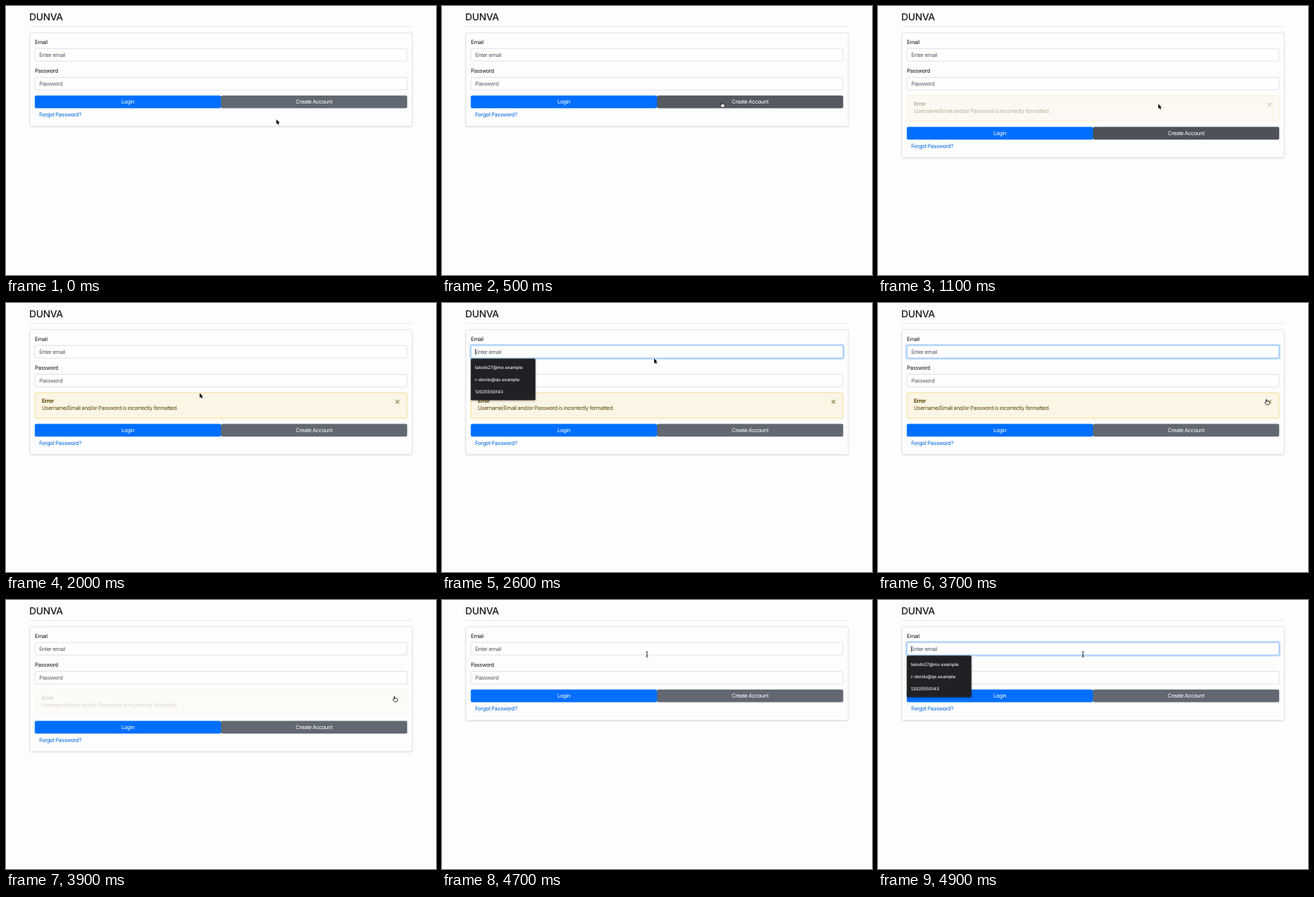
Write an HTML page that moves like this. It is 600 px wide and 375 px high and loops after 5 s.

```html
<!DOCTYPE html>
<html lang="en">
<head>
<meta charset="utf-8">
<title>Login form</title>
<style>
  html, body { margin: 0; width: 100%; height: 100%; overflow: hidden; background: #fdfdfd; }
  svg { display: block; width: 600px; height: 375px; }
  text { font: 400 7.6px Inter, "Open Sans", sans-serif; letter-spacing: -.047em; text-rendering: geometricPrecision; fill: #15181b; }
  .title { font-size: 13.47px; font-weight: 500; letter-spacing: -.02em; }
  .hint { fill: #565c63; }
  .field { fill: #fefefe; stroke: #c8ced4; stroke-width: .6; }
  .button { fill: #fff; text-anchor: middle; }
  .link { fill: #0069e0; }
  #alert text { fill: #5c4600; }
  #alert .bold { font-weight: 700; }
  #alert .close { font-size: 11.5px; font-weight: 700; text-anchor: middle; opacity: .55; }
  #menu { filter: drop-shadow(0 1px 1.5px rgba(0, 0, 0, .3)); }
  #menu text { font-size: 6.2px; font-weight: 500; letter-spacing: -.01em; fill: #f1f1f2; }
  #card { filter: drop-shadow(0 1px 1px rgba(0, 0, 0, .1)); }
</style>
</head>
<body>
<svg viewBox="0 0 600 375">
  <text class="title" x="32.6" y="20">DUNVA</text>
  <path d="M33 28.5H567" stroke="#e4e4e4" stroke-width=".8"/>
  <rect id="card" x="33.2" y="37.2" width="533.6" height="130.3" rx="2" fill="#fdfdfd" stroke="#dcdcdc" stroke-width=".7"/>

  <text x="40.3" y="52.6">Email</text>
  <rect id="glow" x="39.3" y="58.2" width="521.4" height="19.6" rx="2.6" fill="none" stroke="#bfdeff" stroke-width="2"/>
  <rect class="field" x="40.4" y="59.2" width="519.2" height="17.6" rx="2"/>
  <rect id="focusBorder" x="40.4" y="59.2" width="519.2" height="17.6" rx="2" fill="none" stroke="#80bdff" stroke-width=".7"/>
  <text class="hint" x="46.4" y="70.9">Enter email</text>
  <path id="caret" d="M46.5 64V72.5" stroke="#111" stroke-width=".6"/>

  <text x="40.3" y="92.9">Password</text>
  <rect class="field" x="40.4" y="99.4" width="519.2" height="17.6" rx="2"/>
  <text class="hint" x="46.4" y="111.1">Password</text>

  <g id="alert">
    <rect x="40.4" y="125" width="519.2" height="35.6" rx="2" fill="#fbf5e6" stroke="#f4d678" stroke-width=".8"/>
    <text class="bold" x="50" y="139.4">Error</text>
    <text x="50" y="149.2">Username/Email and/or Password is incorrectly formatted.</text>
    <text class="close" x="545.8" y="141.3">×</text>
  </g>

  <g id="actions">
    <rect x="40.2" y="124.8" width="259.8" height="17.8" rx="2" fill="#006fff"/>
    <rect x="300" y="124.8" width="259.8" height="17.8" rx="2" fill="#626872"/>
    <rect id="shade" x="300" y="124.8" width="259.8" height="17.8" rx="2"/>
    <text class="button" x="170" y="136.4">Login</text>
    <text class="button" x="429.8" y="136.4">Create Account</text>
    <text class="link" x="46.3" y="154.4">Forgot Password?</text>
  </g>

  <g id="menu">
    <rect x="40.2" y="77.6" width="90.2" height="57.8" rx="1.5" fill="#202124"/>
    <text x="46" y="92">talodn27@mx.example</text>
    <text x="46" y="108.9">r-donilu@qx.example</text>
    <text x="46" y="125.8">12025550143</text>
  </g>

  <g id="cursor">
    <path id="arrow" d="M0 0V6.7L1.5 5.3L2.5 7.7L3.7 7.2L2.7 4.9H4.7Z" fill="#000" stroke="#fff" stroke-width=".8" paint-order="stroke"/>
    <path id="hand" d="M-1.6 2V-2.3Q-1.1 -3.2 -.5 -2.3V.2Q.2 -.5 .8 .3Q1.5 -.1 2 .6Q3 .4 3.2 1.3V3Q3.1 4 2.4 4.8H-1L-3.2 2.2Q-3.3 1 -2.3 1.3Z" fill="#fff" stroke="#111" stroke-width=".8" stroke-linejoin="round"/>
    <path id="beam" d="M-1.5 -3.7Q0 -3.7 0 -2.8Q0 -3.7 1.5 -3.7M0 -2.8V2.8M-1.5 3.7Q0 3.7 0 2.8Q0 3.7 1.5 3.7M-.8 .9H.8" fill="none" stroke="#111" stroke-width=".8"/>
  </g>
</svg>
<script>
  const LOOP = 5000, FADE = 150, ALERT_SHIFT = 43.6;
  const ALERT = [1040, 3780];
  const FOCUS = [[2400, 3700], [4760, LOOP]];
  // time, x, y
  const PATH = [
    [0, 377.3, 158], [450, 391.2, 136.5], [1200, 391.2, 136.5], [2000, 270.3, 125.5],
    [2350, 287, 70], [2500, 287, 70], [3000, 371.5, 139.5], [3600, 543, 137],
    [4100, 543, 137], [4680, 286, 75.8]
  ];

  const $ = id => document.getElementById(id);
  const clamp = v => Math.max(0, Math.min(1, v));
  const smooth = u => u * u * (3 - 2 * u);
  const pulse = (t, start, end) => clamp((t - start) / FADE) - clamp((t - end) / FADE);
  const show = (id, visible) => $(id).style.display = visible ? "" : "none";

  function pointerAt(t) {
    const next = PATH.findIndex(key => key[0] > t);
    if (next < 0) return PATH.at(-1).slice(1);
    const [t0, x0, y0] = PATH[next - 1], [t1, x1, y1] = PATH[next];
    const u = smooth((t - t0) / (t1 - t0));
    return [x0 + (x1 - x0) * u, y0 + (y1 - y0) * u];
  }

  function cursorFor(x, y, shift) {
    const inside = (left, top, right, bottom) => x > left && x < right && y > top && y < bottom;
    if (inside(40, 59, 560, 77) || inside(40, 99, 560, 117)) return "beam";
    if (inside(40, 125 + shift, 560, 143 + shift)) return "hand";
    if (shift && inside(538, 130, 553, 145)) return "hand";
    if (shift && inside(50, 132, 242, 151)) return "beam";
    return "arrow";
  }

  function draw(t) {
    const alertShown = t >= ALERT[0] && t < ALERT[1] + FADE;
    const shift = alertShown ? ALERT_SHIFT : 0;
    show("alert", alertShown);
    $("alert").setAttribute("opacity", pulse(t, ...ALERT));
    $("actions").setAttribute("transform", `translate(0 ${shift})`);
    $("card").setAttribute("height", 130.3 + shift);

    const hover = pulse(t, 280, 1100) + pulse(t, 3940, 4275);
    const press = pulse(t, 900, 1100);
    $("shade").setAttribute("opacity", .14 * hover + .08 * press);

    const focus = FOCUS.find(([start, end]) => t >= start && t < end);
    const glow = smooth(FOCUS.reduce((sum, span) => sum + pulse(t, ...span), 0));
    $("glow").setAttribute("opacity", glow);
    $("focusBorder").setAttribute("opacity", glow);
    show("menu", focus);
    show("caret", focus && (t - focus[0]) % 1000 < 500);

    const [x, y] = pointerAt(t);
    const kind = cursorFor(x, y, shift);
    for (const id of ["arrow", "hand", "beam"]) show(id, id === kind);
    $("cursor").setAttribute("transform", `translate(${x} ${y})`);
  }

  const start = performance.now();
  function tick() {
    draw((performance.now() - start) % LOOP);
    requestAnimationFrame(tick);
  }
  tick();
</script>
</body>
</html>
```
